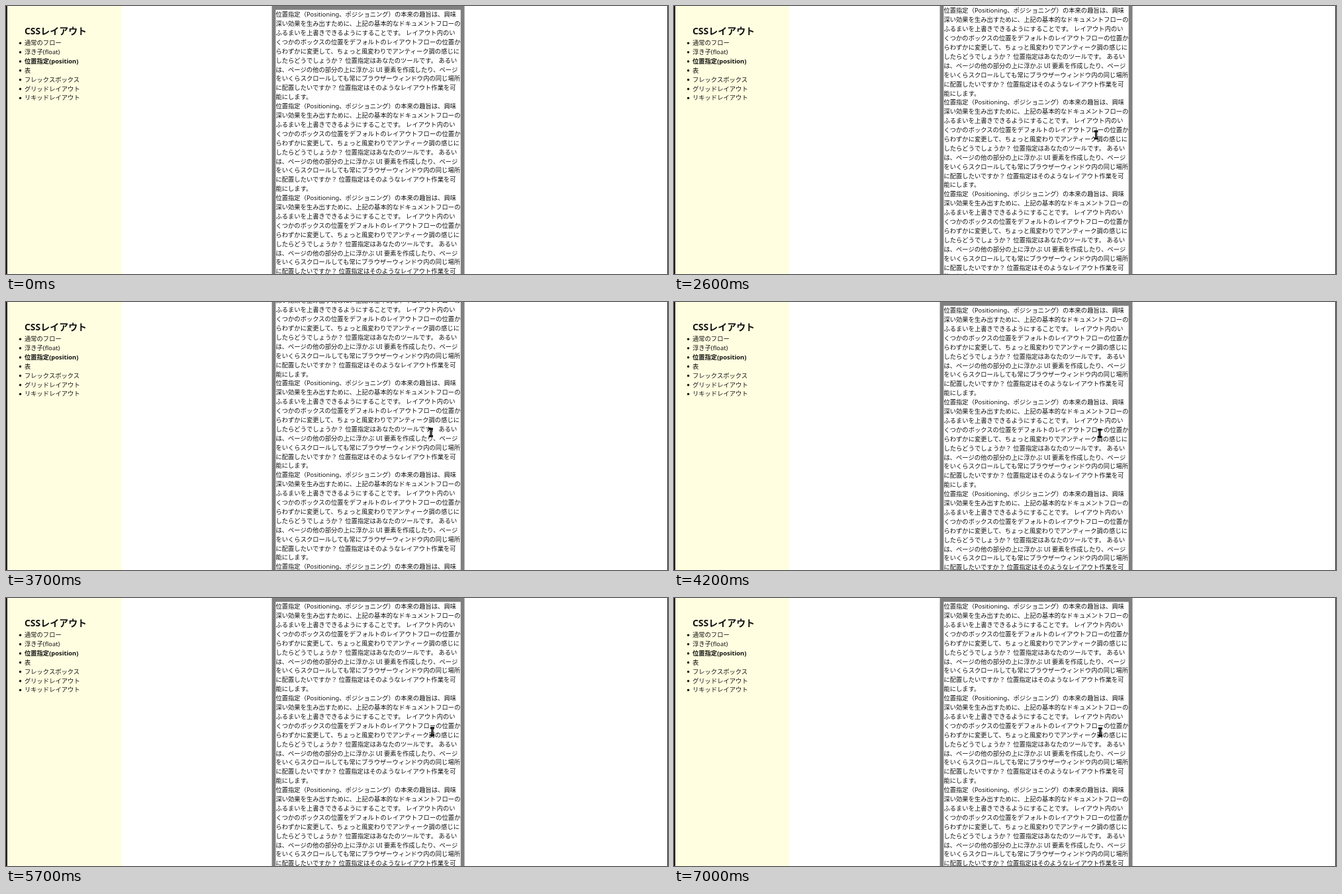
Write an HTML page that moves like this. It is 1000 px wide and 406 px high and loops after 7.2 s.

```html
<!DOCTYPE html>
<html lang="ja">
<head>
<meta charset="utf-8">
<style>
html, body { margin: 0; width: 100%; height: 100%; overflow: hidden; background: #fff; }
#page {
  position: absolute; left: 0; top: 0; width: 1718px; height: 702px; overflow: hidden;
  transform: scale(.582, .579); transform-origin: 0 0;
  font: 16px/24px "Noto Sans", "Noto Sans CJK JP", sans-serif; color: #111;
}
nav { position: absolute; left: 0; top: 0; width: 300px; height: 100%; background: #fffee0; }
h1 { position: absolute; left: 48px; top: 47px; margin: 0; font-size: 24px; line-height: 36px; white-space: nowrap; }
ul { position: absolute; left: 48px; top: 83.5px; margin: 0; padding: 0; list-style: none; white-space: nowrap; }
li { position: relative; }
li::before {
  content: ""; position: absolute; left: -14px; top: 10px;
  width: 6px; height: 6px; border-radius: 50%; background: #111;
}
#box { position: absolute; left: 690px; top: 0; width: 480px; border: 10px solid #808080; }
#box p { margin: 0; white-space: pre; }
.edge { position: absolute; top: 0; width: 1.5px; height: 100%; background: #231f20; }
#cursor { position: absolute; left: -5px; top: -8px; }
</style>
</head>
<body>
<div id="page">
  <nav>
    <h1>CSSレイアウト</h1>
    <ul>
      <li>通常のフロー</li>
      <li>浮き子(float)</li>
      <li><b>位置指定(position)</b></li>
      <li>表</li>
      <li>フレックスボックス</li>
      <li>グリッドレイアウト</li>
      <li>リキッドレイアウト</li>
    </ul>
  </nav>
  <div id="box"></div>
</div>
<div class="edge" style="left:0"></div>
<div class="edge" style="right:0;width:1px"></div>
<svg id="cursor" width="10" height="16" fill="none">
  <path d="M2 2.5H8M5 2.5V13.5M2 13.5H8" stroke="#111" stroke-width="3.2"/>
  <path d="M5 3.5V12.5" stroke="#999" stroke-width=".8"/>
</svg>
<script>
const LOOP = 7200, STEP = 100, SCALE_Y = .579;
const paragraph = `位置指定（Positioning、ポジショニング）の本来の趣旨は、興味
深い効果を生み出すために、上記の基本的なドキュメントフローの
ふるまいを上書きできるようにすることです。 レイアウト内のい
くつかのボックスの位置をデフォルトのレイアウトフローの位置か
らわずかに変更して、ちょっと風変わりでアンティーク調の感じに
したらどうでしょうか？ 位置指定はあなたのツールです。 あるい
は、ページの他の部分の上に浮かぶ UI 要素を作成したり、ページ
をいくらスクロールしても常にブラウザーウィンドウ内の同じ場所
に配置したいですか？ 位置指定はそのようなレイアウト作業を可
能にします。`;

// Each swipe scrolls down to a depth, rests, then returns to the top
const swipes = [
  { depth: 46, down: 1800, downMs: 300, up: 2500, upMs: 200 },
  { depth: 230, down: 2900, downMs: 300, up: 3600, upMs: 200 },
  { depth: 353, down: 4200, downMs: 200, up: 4900, upMs: 300 },
  { depth: 353, down: 5900, downMs: 600, up: 6800, upMs: 200 }
];

const box = document.getElementById('box');
const cursor = document.getElementById('cursor');
for (let i = 0; i < 8; i++) box.appendChild(document.createElement('p')).textContent = paragraph;

const progress = (t, start, length) => Math.min(1, Math.max(0, (t - start) / length));
const easeOut = (u, power = 3) => 1 - (1 - u) ** power;

const scrollAt = t => swipes.reduce((sum, s) => sum + s.depth *
  (easeOut(progress(t, s.down, s.downMs)) - easeOut(progress(t, s.up, s.upMs))), 0);

// The pointer sweeps in from the right, then drifts slowly
function cursorAt(t) {
  const enter = progress(t, 100, 1000), drift = progress(t, 2500, 3500);
  return [
    916 - 279 * easeOut(enter, 2) + 7 * easeOut(drift),
    365 - 170 * enter ** 3 + 8 * drift
  ];
}

function draw() {
  const t = Math.floor(performance.now() % LOOP / STEP) * STEP;
  const [x, y] = cursorAt(t);
  box.style.transform = `translateY(${-scrollAt(t) / SCALE_Y}px)`;
  cursor.style.transform = `translate(${x}px, ${y}px)`;
  cursor.style.visibility = t < 100 ? 'hidden' : 'visible';
  requestAnimationFrame(draw);
}
draw();
</script>
</body>
</html>
```
